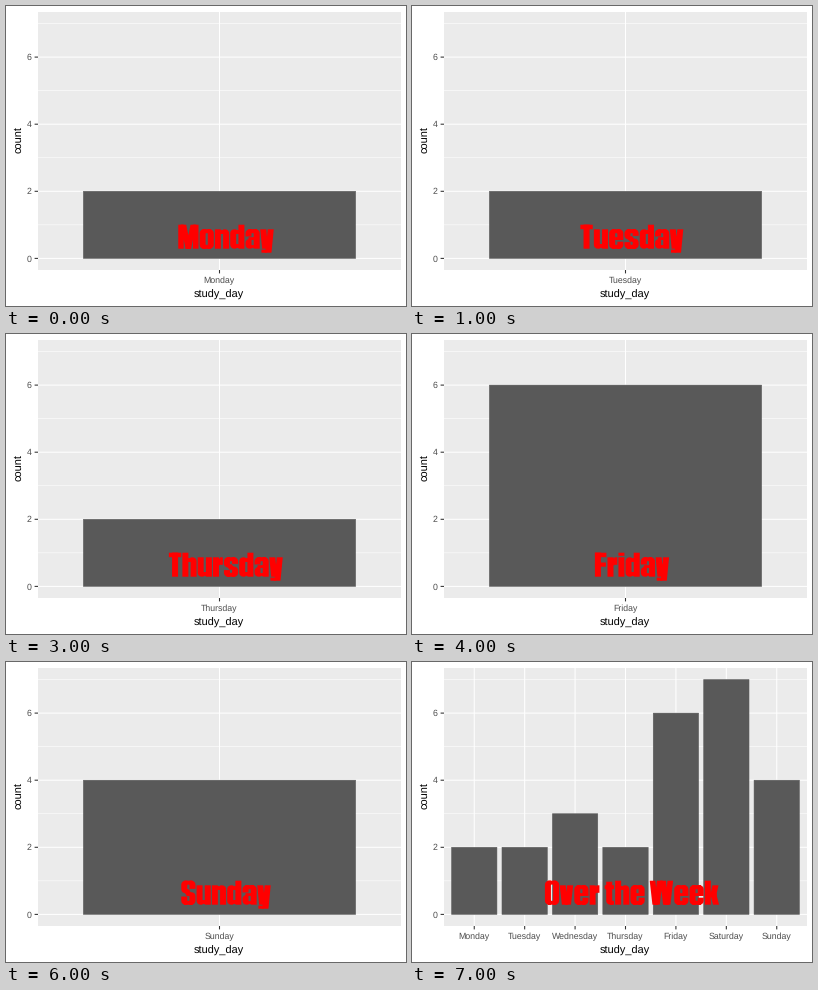
A matplotlib script for the animation above (8 s loop, 400 by 300 pixels).

```python
import numpy as np
import matplotlib.pyplot as plt
from matplotlib.animation import FuncAnimation
from matplotlib.patches import PathPatch, Rectangle
from matplotlib.path import Path

W, H, DPI = 400, 300, 100
PT = 72 / DPI                      # points per pixel
LEFT, RIGHT, TOP, BOTTOM = 32, 395, 6, 264
ZERO, UNIT = 252.4, 33.55
TICK = 3.4
BAR, PANEL, INK, DARK = "#595959", "#EBEBEB", "#4D4D4D", "#333333"

COUNTS = dict(Monday=2, Tuesday=2, Wednesday=3, Thursday=2,
              Friday=6, Saturday=7, Sunday=4)
DAYS = list(COUNTS)

plt.rcParams.update({"font.family": "Liberation Sans", "text.hinting": "none"})

# Heavy condensed lettering: upright stems in two columns, joined by bars.
# Units are pixels above the baseline; every outline runs anticlockwise.
CAP, XH, DROP = 24, 19.4, -4       # capital, small and descender heights
STEM, GAP, THICK = 6, 2.2, 3.9     # stem width, space inside, bar weight
SIDE, ROUND = .55, 4
STEP = STEM + GAP


def box(x0, y0, x1, y1, turn=""):
    pts = []
    sides = [("tr", x1, y1), ("tl", x0, y1), ("bl", x0, y0), ("br", x1, y0)]
    for n, (name, x, y) in enumerate(sides):
        r = ROUND if name in turn else 0
        a = np.radians(np.linspace(90 * n, 90 * n + 90, 8))
        cx = x - r if x == x1 else x + r
        cy = y - r if y == y1 else y + r
        pts.append(np.column_stack([cx + r * np.cos(a), cy + r * np.sin(a)]))
    return np.vstack(pts)


def stem(col, lo=0, hi=XH, turn=""):
    x = SIDE + col * STEP
    return box(x, lo, x + STEM, hi, turn)


def bar(y, thick=THICK):
    return box(SIDE + STEM / 2, y, SIDE + STEP + STEM / 2, y + thick)


def leg(x0, top, x1, low, w=STEM):
    return np.array([(x0, top), (x1, low), (x1 + w, low), (x0 + w, top)])


def vee(x, h, spread, lean, w=STEM):
    return [leg(x, h, x + lean, 0, w), leg(x + spread, h, x + spread - lean, 0, w)]


def bowl(h):
    return [stem(0, 0, h, "tl bl"), stem(1, 0, h, "tr br"), bar(0), bar(h - THICK)]


def arch(h):
    return [stem(0, 0, h), stem(1, turn="tr"), bar(XH - THICK - .8)]


def ess(h):
    return [stem(0, .48 * h, h, "tl bl"), stem(1, .66 * h, h, "tr"),
            stem(0, 0, .34 * h, "bl"), stem(1, 0, .52 * h, "tr br"),
            leg(SIDE + .3 * STEM, .64 * h, SIDE + .9 * STEM, .36 * h),
            bar(0), bar(h - THICK)]


GLYPHS = {
    "o": bowl(XH), "O": bowl(CAP), "n": arch(XH), "h": arch(CAP),
    "s": ess(XH), "S": ess(CAP),
    "u": [stem(0, turn="bl"), stem(1), bar(.8)],
    "d": [stem(0, turn="tl bl"), stem(1, hi=CAP), bar(.8), bar(XH - THICK - .8)],
    "a": [stem(1, turn="tr"), stem(0, .63 * XH, XH, "tl"),
          stem(0, 0, XH / 2, "tl bl"),
          bar(XH - THICK), bar(.45 * XH, 2.8), bar(.8, 2.8)],
    "e": [stem(0, turn="tl bl"), stem(1, .45 * XH, XH, "tr"),
          stem(1, 0, .36 * XH, "br"),
          bar(0), bar(.45 * XH, 2.8), bar(XH - THICK)],
    "v": vee(0, XH, 7.5, 2.2),
    "y": vee(0, XH, 7.5, 1.9) + [leg(5.6, 0, 5.2, DROP), box(1.2, DROP, 6, -.9)],
    "W": vee(0, CAP, 7.2, 2.7, 5.6) + vee(10.6, CAP, 7.2, 2.7, 5.6),
    "M": vee(3, CAP, 9.8, 4.9, 5.5) + [box(SIDE, 0, 6, CAP), box(15.3, 0, 20.8, CAP)],
    "T": [box(.2, CAP - 4.5, 12.6, CAP), box(3.4, 0, 3.4 + STEM, CAP)],
    "F": [stem(0, hi=CAP), box(SIDE, CAP - 4.5, 12, CAP), box(SIDE, 10, 11.5, 14.2)],
    "r": [stem(0), leg(SIDE + STEM / 2, XH - 1.2, SIDE + STEM / 2, 11.5, 4),
          box(SIDE + STEM + 1, 11.9, 10.4, XH)],
    "i": [stem(0), stem(0, XH + 1.5, CAP)],
    "t": [box(1.7, 0, 1.7 + STEM, 23, "bl"), box(.2, XH - THICK, 9.5, XH),
          box(5.7, 0, 9.5, THICK)],
    "k": [stem(0, hi=CAP), leg(8.2, XH, 5.8, 8.5), leg(5.8, 11.5, 8.8, 0)],
}


def lettering(word, center=220, base=242.7):
    outlines, x = [], 0
    for c in word:
        parts = GLYPHS.get(c, [])
        outlines += [p + (x, 0) for p in parts]
        x += max((p[:, 0].max() for p in parts), default=4) + SIDE
    paths = [Path(np.vstack([p, p[:1]]) * (1, -1) + (center - x / 2, base), closed=True)
             for p in outlines]
    return PathPatch(Path.make_compound_path(*paths), fc="red", lw=0, zorder=5)


fig = plt.figure(figsize=(W / DPI, H / DPI), dpi=DPI, facecolor="white")
ax = fig.add_axes([0, 0, 1, 1])


def line(x, y, width=1.07, color="white"):
    ax.plot(x, y, color=color, lw=width * PT, solid_capstyle="butt",
            snap=False, zorder=1)


def label(x, y, text, size=8.8, color=INK, ha="center", **kw):
    ax.text(x, y, text, fontsize=size * PT, color=color, ha=ha, va="baseline", **kw)


def draw(i):
    ax.clear()
    ax.set(xlim=(0, W), ylim=(H, 0))
    ax.axis("off")
    ax.add_patch(Rectangle((LEFT, TOP), RIGHT - LEFT, BOTTOM - TOP,
                           fc=PANEL, lw=0, zorder=0))
    days = DAYS[i:i + 1] or DAYS
    step = (RIGHT - LEFT) / (len(days) + .2)

    for v in range(8):
        y = ZERO - v * UNIT
        line([LEFT, RIGHT], [y, y], .55 if v % 2 else 1.07)
        if v % 2 == 0:
            line([LEFT - TICK, LEFT], [y, y], color=DARK)
            label(25.6, y + 3.1, str(v), ha="right")

    for n, day in enumerate(days):
        x = LEFT + (n + .6) * step
        line([x, x], [TOP, BOTTOM])
        line([x, x], [BOTTOM, BOTTOM + TICK], color=DARK)
        label(x - .4, 277, day)
        tall = COUNTS[day] * UNIT
        ax.add_patch(Rectangle((x - .45 * step, ZERO - tall), .9 * step, tall,
                               fc=BAR, ec=BAR, lw=.5 * PT, joinstyle="miter",
                               snap=False, zorder=3))

    label(212.5, 291.5, "study_day", 11, "black")
    label(15.3, 134, "count", 11, "black", rotation=90, rotation_mode="anchor")
    ax.add_patch(lettering(days[0] if len(days) == 1 else "Over the Week"))
    return []


anim = FuncAnimation(fig, draw, frames=8, interval=1000, init_func=lambda: draw(0),
                     repeat=True, blit=False)
plt.show()
```
